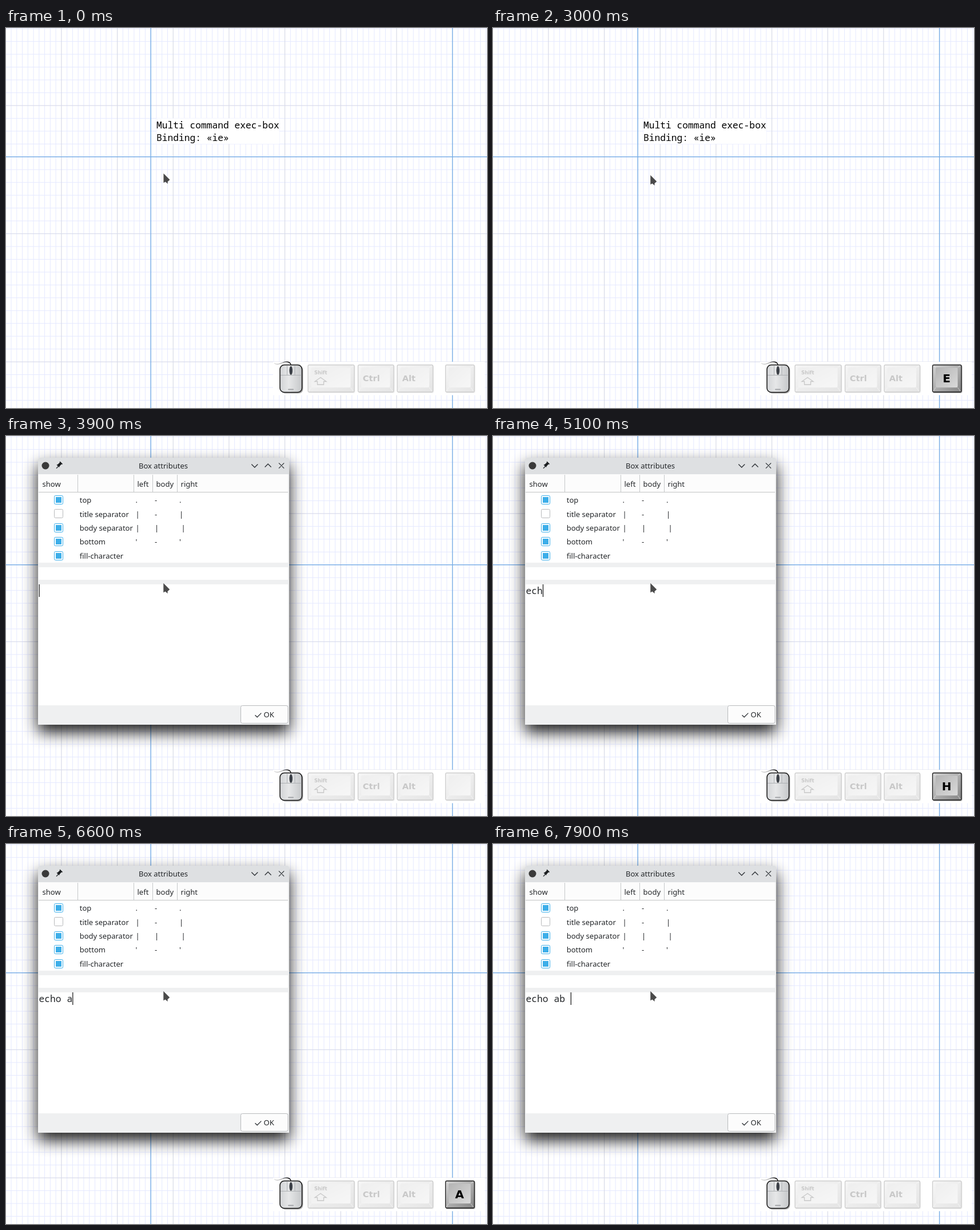
Recreate the animation shown at these times as an HTML page. Size 841 px wide and 666 px high, loop 8000 ms.

```html
<!DOCTYPE html>
<html lang="en">
<head>
<meta charset="utf-8">
<title>Box attributes</title>
<style>
html, body { margin: 0; width: 100%; height: 100%; overflow: hidden; background: #fff; }
svg { display: block; width: 841px; height: 666px; }
text { white-space: pre; }
.mono { font: 16.28px "Noto Sans Mono", monospace; }
.ui { font: 13.02px "Noto Sans", sans-serif; fill: #232629; }
.cap { font: bold 14.6px "DejaVu Sans", sans-serif; }
.line { fill: none; stroke: #2f3337; stroke-width: 1.3; }
</style>
</head>
<body>
<svg id="stage" viewBox="0 0 841 666" xmlns="http://www.w3.org/2000/svg">
  <defs>
    <filter id="blur" x="-20%" y="-20%" width="140%" height="140%"><feGaussianBlur stdDeviation="14"/></filter>
    <linearGradient id="rim" x1="0" y1="0" x2="1" y2="1">
      <stop offset="0" stop-color="#d4d4d4"/><stop offset="1" stop-color="#858585"/>
    </linearGradient>
    <linearGradient id="face" x1="0" y1="0" x2="1" y2="1">
      <stop offset="0" stop-color="#b4b4b4"/><stop offset="1" stop-color="#dadada"/>
    </linearGradient>
    <linearGradient id="shell" x1="0" y1="0" x2="1" y2="0">
      <stop offset="0" stop-color="#d2d4d6"/><stop offset=".4" stop-color="#e6e7e8"/><stop offset="1" stop-color="#c6c8ca"/>
    </linearGradient>
    <linearGradient id="cable" x1="0" y1="0" x2="1" y2="0">
      <stop offset="0" stop-color="#ddd"/><stop offset=".5" stop-color="#aaa"/><stop offset=".75" stop-color="#111"/>
    </linearGradient>
  </defs>
  <g id="grid"></g>
  <g id="note"></g>
  <g id="dialog"></g>
  <g id="keys"></g>
  <path id="pointer" d="M.3 0V16.2L3.6 14.4L7.5 18V14.2L11.2 11Z" fill="#4a4a4a" stroke="#e4e4e4" stroke-width=".7" paint-order="stroke"/>
</svg>
<script>
const $ = id => document.getElementById(id);
const NS = "http://www.w3.org/2000/svg";

function add(parent, tag, attrs, content) {
  const el = document.createElementNS(NS, tag);
  for (const name in attrs) el.setAttribute(name, attrs[name]);
  if (content !== undefined) el.textContent = content;
  parent.appendChild(el);
  return el;
}
const rect = (parent, x, y, width, height, fill, more) =>
  add(parent, "rect", { x, y, width, height, fill, ...more });
const label = (parent, x, y, str, cls = "ui", more) =>
  add(parent, "text", { x, y, class: cls, ...more }, str);
const path = (parent, d, more) => add(parent, "path", { d, class: "line", ...more });

// Character grid
const CELL_W = 9.767, CELL_H = 22.46, ORIGIN_X = 96.9, ORIGIN_Y = 135.9;
const colX = i => ORIGIN_X + i * CELL_W;
const rowY = i => ORIGIN_Y + i * CELL_H;

function drawGrid(g) {
  const vertical = (i, color, w) => rect(g, colX(i) - w / 2, 0, w, 666, color);
  const horizontal = (i, color, w) => rect(g, 0, rowY(i) - w / 2, 841, w, color);
  for (let i = -9; i <= 76; i++) if (i % 10) vertical(i, "#e5e9ff", 1);
  for (let i = -6; i <= 23; i++) if (i % 10) horizontal(i, "#e5e9ff", 1);
  for (let i = 0; i <= 70; i += 10) vertical(i, "#d5d8e6", 1.1);
  for (let i = 0; i <= 20; i += 10) horizontal(i, "#d9dbec", 1.2);
  [16, 70].forEach(i => vertical(i, "#78aee6", 1.4));
  horizontal(4, "#78aee6", 1.4);
}

function drawNote(g) {
  rect(g, colX(17), rowY(1), 22 * CELL_W, 2 * CELL_H, "#fff");
  label(g, colX(17), 176, "Multi command exec-box", "mono");
  label(g, colX(17), 198.4, "Binding: «ie»", "mono");
}

function drawCheckbox(g, cy, on) {
  rect(g, 84.5, cy - 7.5, 15, 15, "#fff", { rx: 2, stroke: on ? "#3daee9" : "#b7b9bb" });
  if (on) rect(g, 87, cy - 5, 10, 10, "#3daee9");
}

let typed, caret;

function drawDialog(g) {
  rect(g, 56, 51, 439, 468, "#000", { rx: 4, opacity: .9, filter: "url(#blur)" });
  path(g, "M56 506V42q0-4 4-4H491q4 0 4 4V506Z", { style: "fill:#eff0f1;stroke:none" });
  path(g, "M56 67V42q0-4 4-4H491q4 0 4 4V67Z", { style: "fill:#dee0e2;stroke:none" });

  add(g, "circle", { cx: 69, cy: 52, r: 6.5, fill: "#3a3a3a" });
  path(g, "M88.5 50.5l2-.7 3.5-3.2-.3-1.4.8-.8 4.6 4.6-.8.8-1.4-.3-3.2 3.5-.7 2z", { style: "fill:#1b1e20;stroke:none" });
  path(g, "M88 56.8L91.5 53");
  label(g, 275, 56.5, "Box attributes", "ui", { "text-anchor": "middle" });
  path(g, "M429.3 49.5L434.8 55L440.3 49.5M452.6 54.5L458.1 49L463.6 54.5M477 47.4L486.2 56.6M486.2 47.4L477 56.6");

  rect(g, 57, 67, 436, 32, "#fcfcfc");
  [125, 223, 256, 299].forEach(x => rect(g, x, 68, 1, 30, "#c6c8c9"));
  rect(g, 57, 98, 436, 1, "#c3c5c6");
  rect(g, 57, 99, 436, 123, "#fff");
  rect(g, 57, 230, 436, 22, "#fff");
  rect(g, 57, 260, 436, 212, "#fff");

  label(g, 63.5, 88.6, "show");
  label(g, 229.5, 88.6, "left");
  label(g, 262.5, 88.6, "body");
  label(g, 305.5, 88.6, "right");

  const rows = [
    ["top", 1, ".", "-", "."],
    ["title separator", 0, "|", "-", "|"],
    ["body separator", 1, "|", "|", " |"],
    ["bottom", 1, "'", "-", "'"],
    ["fill-character", 1, "", "", ""]
  ];
  rows.forEach(([name, on, left, body, right], i) => {
    const y = i * 24.4;
    drawCheckbox(g, 112 + Math.round(y), on);
    label(g, 128.7, 117.2 + y, name);
    label(g, 226.5, 117.2 + y, left);
    label(g, 260, 117.2 + y, body);
    label(g, 303, 117.2 + y, right);
  });

  rect(g, 410.5, 472.5, 82.5, 31, "#fcfcfc", { rx: 3, stroke: "#b9bbbd" });
  path(g, "M435.5 489.2L439.2 492.8L446.3 485.6");
  label(g, 450.5, 493.3, "OK");

  typed = label(g, 57.6, 277.4, "", "mono", { fill: "#232629" });
  caret = rect(g, 57.6, 260, 1.2, 22, "#111");
}

function drawKey(parent, x, w, opacity) {
  const g = add(parent, "g", { opacity });
  rect(g, x + 1, 591, w, 49, "#000", { rx: 3, opacity: .3 });
  rect(g, x + .5, 590.5, w - 1, 47.5, "url(#rim)", { rx: 2.5, stroke: "#181818", "stroke-width": 1.3 });
  rect(g, x + 6, 595, w - 13, 35, "url(#face)", { rx: 2 });
  path(g, `M${x + 1.5} 591.5L${x + 6} 595M${x + w - 2} 591.5L${x + w - 7} 595M${x + 1.5} 637L${x + 6} 630M${x + w - 2} 637L${x + w - 7} 630`,
    { style: "stroke:#eee;stroke-width:.6" });
  return g;
}

let leftButton, idleKey, letterKey, letter, spaceKey;
const FADED = .21;

function drawMouse(g) {
  path(g, "M469 587.5C474 591 479 588.5 484 586.5C490 584.2 498 584.5 498 591", { style: "stroke:url(#cable);stroke-width:1.4" });
  rect(g, 480.5, 592, 39, 48.5, "#000", { rx: 8, opacity: .35 });
  rect(g, 479, 590.5, 38.5, 48, "url(#shell)", { rx: 7.5, stroke: "#151515", "stroke-width": 1.5 });
  leftButton = path(g, "M481.5 608V597q0-6 6-6H494V608Z", { style: "fill:#555a60;stroke:none" });
  path(g, "M480 608.5H517M491.5 591.5V608M505 591.5V608", { style: "stroke:#a9acaf;stroke-width:.9" });
  add(g, "ellipse", { cx: 498.2, cy: 600.3, rx: 2.3, ry: 7.3, fill: "#3b4048", stroke: "#202328", "stroke-width": .7 });
  rect(g, 493, 632.5, 10, 2, "#a1a4a7", { rx: 1 });
}

function drawKeys(g) {
  rect(g, 467, 585, 370, 58.5, "#fff");
  drawMouse(g);
  const shift = drawKey(g, 527.5, 82, FADED);
  label(shift, 539, 607, "Shift", "cap", { style: "font-size:8.4px" });
  path(shift, "M550 612.5L560 619.5H555.5V625H544.5V619.5H540Z", { style: "stroke:#000" });
  label(drawKey(g, 615, 63.5, FADED), 623.8, 618.5, "Ctrl", "cap");
  label(drawKey(g, 683.5, 63.5, FADED), 692.8, 618.5, "Alt", "cap");

  idleKey = drawKey(g, 768, 51.5, FADED);
  letterKey = drawKey(g, 768, 51.5, 1);
  letter = label(letterKey, 793, 621, "", "cap", { style: "font-size:20px", "text-anchor": "middle" });
  spaceKey = drawKey(g, 752, 82, 1);
  label(spaceKey, 792.5, 618.5, "Space", "cap", { "text-anchor": "middle" });
}

// Timelines: [start in ms, value]
const LOOP = 8000;
const KEY = [[0, ""], [2800, "I"], [3000, "E"], [3600, ""], [4700, "E"], [5000, "C"], [5100, "H"],
  [5600, ""], [5700, "O"], [6300, "Space"], [6600, "A"], [7000, "B"], [7300, "Space"], [7900, ""]];
const TYPE_TIMES = [4700, 5000, 5100, 5700, 6300, 6600, 7000, 7300];
const COMMAND = "echo ab ";
const POINTER = [[0, [275.2, 255]], [200, [274.9, 258.4]], [800, [275, 258]]];

const at = (line, t) => line.filter(([start]) => start <= t).pop()[1];
const within = (t, from, to) => t >= from && t < to;
const show = (el, on) => el.setAttribute("visibility", on ? "inherit" : "hidden");

function render(t) {
  const key = at(KEY, t);
  show(idleKey, !key);
  show(letterKey, key.length === 1);
  show(spaceKey, key === "Space");
  letter.textContent = key;

  show(leftButton, within(t, 1200, 1400));
  $("pointer").setAttribute("transform", `translate(${at(POINTER, t)})`);

  show($("dialog"), t >= 3100);
  const count = TYPE_TIMES.filter(start => start <= t).length;
  typed.textContent = COMMAND.slice(0, count);
  caret.setAttribute("x", 57.6 + count * CELL_W);
  show(caret, !within(t, 3500, 3900));
}

drawGrid($("grid"));
drawNote($("note"));
drawDialog($("dialog"));
drawKeys($("keys"));

function tick() {
  render(performance.now() % LOOP);
  requestAnimationFrame(tick);
}
tick();
</script>
</body>
</html>
```
